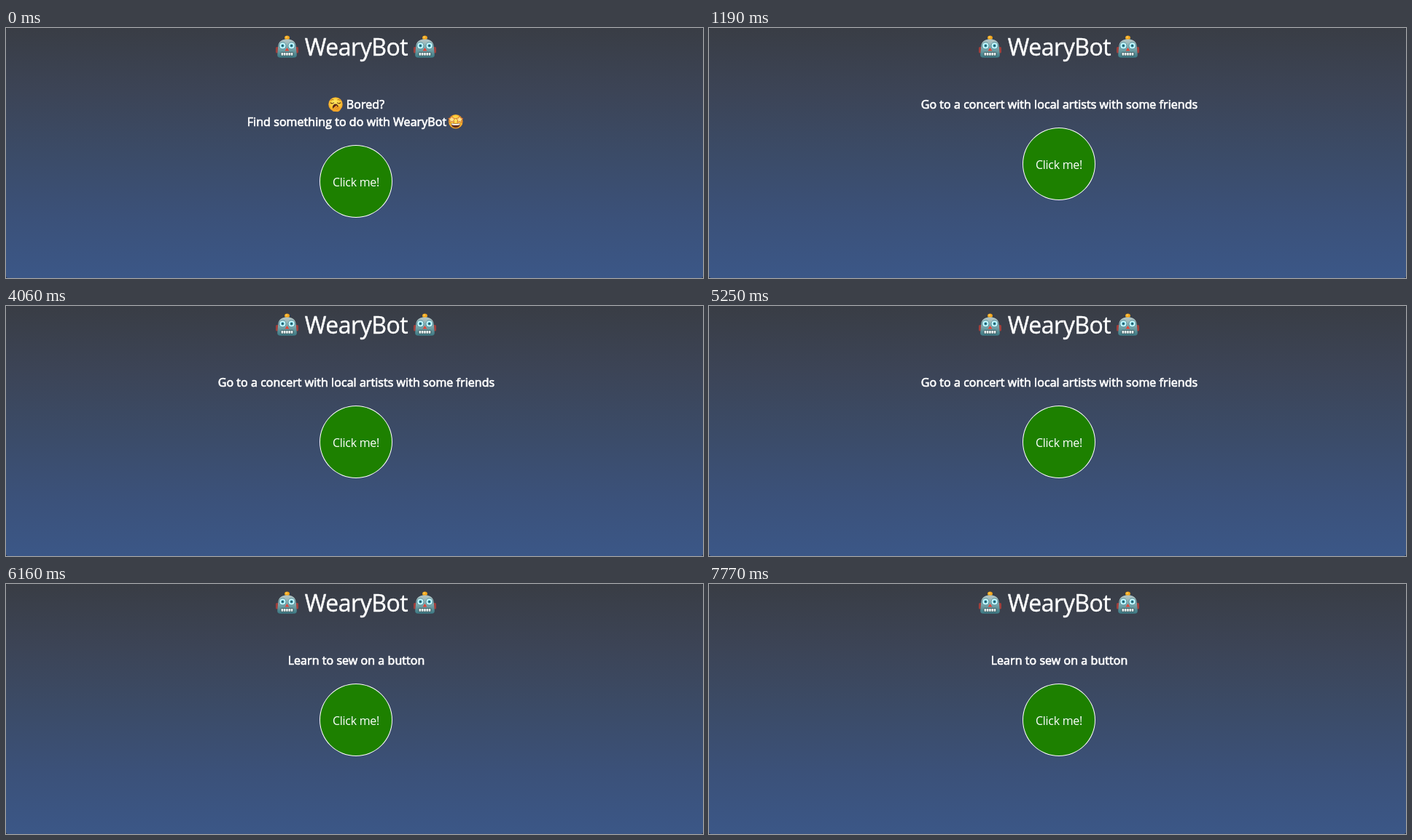
An HTML page with a canvas for the animation above (8 s loop, 956 by 344 pixels).

```html
<!DOCTYPE html>
<html lang="en">
<head>
<meta charset="utf-8">
<title>WearyBot</title>
<style>
html, body { margin: 0; width: 100%; height: 100%; overflow: hidden; background: #3b4a64; }
canvas, svg { position: absolute; left: 0; top: 0; width: 956px; height: 344px; display: block; }
text { font: 16px "Open Sans", "Noto Sans", sans-serif; fill: #fff; text-anchor: middle; white-space: pre; }
.title { font-size: 32px; letter-spacing: -0.5px; stroke: #fff; stroke-width: 0.45px; }
.bold { stroke: #fff; stroke-width: 0.7px; letter-spacing: 0.06px; }
.label { letter-spacing: -0.25px; }
</style>
</head>
<body>
<canvas id="stage" width="956" height="344"></canvas>
<svg viewBox="0 0 956 344">
  <text class="title" x="480.5" y="38">WearyBot</text>
  <text class="bold" id="line1" y="111"></text>
  <text class="bold" id="line2" x="467.5" y="135">Find something to do with WearyBot</text>
  <text class="label" id="label" x="480" y="218">Click me!</text>
</svg>
<script>
const $ = id => document.getElementById(id);
const ctx = $('stage').getContext('2d');
const W = 956, H = 344, LOOP = 8000;

const scenes = [
  { at: 0, text: 'Bored?', x: 493, intro: true },
  { at: 1190, text: 'Go to a concert with local artists with some friends', x: 480.5 },
  { at: 5530, text: 'Learn to sew on a button', x: 480.5 }
];

function disc(x, y, rx, fill, ry = rx) {
  ctx.beginPath();
  ctx.ellipse(x, y, rx, ry, 0, 0, Math.PI * 2);
  ctx.fillStyle = fill;
  ctx.fill();
}

function box(x, y, w, h, r, fill) {
  ctx.beginPath();
  ctx.roundRect(x, y, w, h, r);
  ctx.fillStyle = fill;
  ctx.fill();
}

function shape(path, fill) {
  ctx.fillStyle = fill;
  ctx.fill(new Path2D(path));
}

function line(path, color, width) {
  ctx.strokeStyle = color;
  ctx.lineWidth = width;
  ctx.lineCap = 'round';
  ctx.stroke(new Path2D(path));
}

function at(x, y, draw) {
  ctx.save();
  ctx.translate(x, y);
  draw();
  ctx.restore();
}

function vertical(y0, y1, ...colors) {
  const g = ctx.createLinearGradient(0, y0, 0, y1);
  colors.forEach((c, i) => g.addColorStop(i / (colors.length - 1), c));
  return g;
}

function backdrop() {
  ctx.fillStyle = vertical(0, H, '#393d45', '#3c4456', '#3b4b67', '#3b5179', '#3b5787');
  ctx.fillRect(0, 0, W, H);
  const frame = new Path2D();
  frame.rect(0, 0, W, H);
  frame.roundRect(0, 0, W, H, 3);
  ctx.fillStyle = '#262c36';
  ctx.fill(frame, 'evenodd');
}

function robot() {
  box(-15.5, 0, 4, 8.5, 1.5, '#a23f3b');
  box(11.5, 0, 4, 8.5, 1.5, '#a23f3b');
  shape('M-4.5 -9 Q-4 -12 0 -12 Q4 -12 4.5 -9 Z', '#4f7c83');
  disc(0, -12.8, 3.4, '#f3a51d', 2.8);
  disc(-0.8, -13.6, 1.6, '#ffcf55', 1);
  shape('M0 -10.5 C9 -10.5 12 -6 12.3 0 L13.3 11 Q13.3 14.8 9.5 14.8 H-9.5 Q-13.3 14.8 -13.3 11 L-12.3 0 C-12 -6 -9 -10.5 0 -10.5 Z',
    vertical(-10, 15, '#b3c5c5', '#79a5aa', '#397782'));
  for (const x of [-6.1, 6.1]) {
    disc(x, -1.6, 4.9, '#387f8d');
    disc(x, -1.6, 4.1, '#d4fbff');
    disc(x, -1.6, 2.4, '#51b9cd');
    disc(x, -1.6, 1.3, '#234d58');
  }
  shape('M0 1 L2.9 5.4 H-2.9 Z', '#e64336');
  box(-9, 7.2, 18, 5.4, 1.5, '#37545a');
  for (let i = 0; i < 5; i++) box(-8 + i * 3.3, 8.1, 2.7, 3.6, 0.4, '#e7efee');
}

function face() {
  const g = ctx.createRadialGradient(-1, -3, 2, 0, 0, 10);
  g.addColorStop(0, '#ffe45c');
  g.addColorStop(0.7, '#fdc631');
  g.addColorStop(1, '#e9942a');
  disc(0, 0, 9.8, g);
}

function yawn() {
  face();
  line('M-6.8 -2.2 Q-4.7 -0.2 -2.4 -2.2 M2.4 -2.2 Q4.7 -0.2 6.8 -2.2', '#633b16', 1.1);
  line('M-6.2 -5.8 Q-4.6 -7 -3 -6.3 M3 -6.3 Q4.6 -7 6.2 -5.8', '#8b551d', 0.8);
  disc(0, 4, 4.2, '#5b2819', 4.4);
  shape('M-3.5 9.8 Q-5 7 -3 5 L0.8 1.8 Q2.3 1.3 2.4 2.8 L1.4 4.2 L4.8 2.6 Q6.6 2.8 5.7 4.3 L6.7 5.4 Q7 9 3 10.2 Z', '#f3a528');
  line('M-0.8 6 L1.6 3.6 M1.2 7.2 L5 4.4', '#c87821', 0.6);
}

function star(x) {
  ctx.beginPath();
  for (let i = 0; i < 10; i++) {
    const r = i % 2 ? 2.5 : 5.2, a = i * Math.PI / 5 - Math.PI / 2;
    ctx.lineTo(x + r * Math.cos(a), -2.8 + r * Math.sin(a));
  }
  ctx.closePath();
  ctx.fillStyle = '#ffe28a';
  ctx.fill();
  ctx.strokeStyle = '#c9571d';
  ctx.lineWidth = 0.8;
  ctx.stroke();
}

function starStruck() {
  face();
  shape('M-6.5 1.9 Q0 3.5 6.5 1.9 Q5.8 8.4 0 8.4 Q-5.8 8.4 -6.5 1.9 Z', '#67301c');
  shape('M-5.9 2.4 Q0 3.8 5.9 2.4 L5.4 4.5 Q0 5.5 -5.4 4.5 Z', '#fff');
  star(-5.3);
  star(5.3);
}

function button(y) {
  disc(480, y, 50, '#fff');
  disc(480, y, 49, '#1d8000');
}

function show(scene) {
  const drop = scene.intro ? 24 : 0;
  backdrop();
  at(385.5, 26, robot);
  at(574.5, 26, robot);
  if (scene.intro) {
    at(452, 105, yawn);
    at(616.8, 128.8, starStruck);
  }
  button(187 + drop);
  $('line1').textContent = scene.text;
  $('line1').setAttribute('x', scene.x);
  $('line2').style.display = scene.intro ? '' : 'none';
  $('label').setAttribute('y', 194 + drop);
}

const start = performance.now();
let current;

function tick(now) {
  const t = Math.max(0, now - start) % LOOP;
  const scene = scenes.findLast(s => s.at <= t);
  if (scene !== current) show(current = scene);
  requestAnimationFrame(tick);
}

show(current = scenes[0]);
requestAnimationFrame(tick);
</script>
</body>
</html>
```
